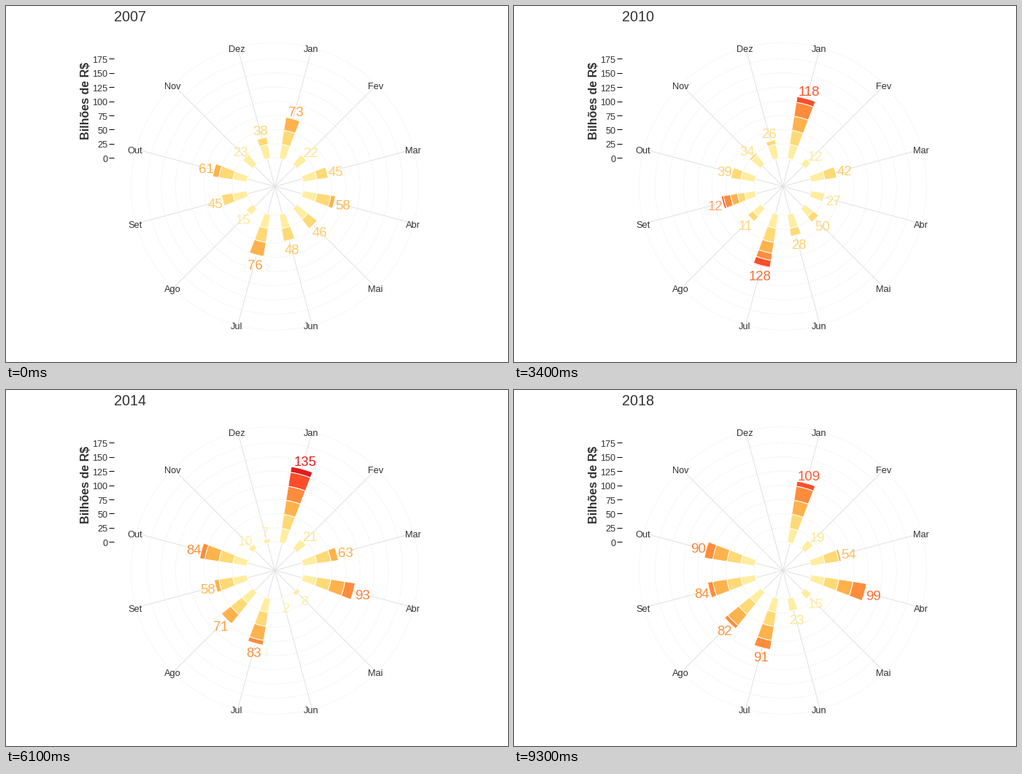
A matplotlib script for the animation above (10 s loop, 688x488 px).

```python
import numpy as np
import matplotlib.pyplot as plt
from matplotlib.animation import FuncAnimation
from matplotlib.colors import to_rgb
from matplotlib.patches import Circle, Wedge

W, H = 688, 488
CX, CY = 368.5, 247.3
UNIT = 0.7783          # pixels per billion
BASE, STEP = 50, 25    # value offset of the centre, size of one band
OUTER = 197
MONTHS = "Jan Fev Mar Abr Mai Jun Jul Ago Set Out Nov Dez".split()
PALETTE = ["#ffeda0", "#fed976", "#feb24c", "#fd8d3c",
           "#fc4e2a", "#e31a1c", "#b10026"]
RGB = np.array([to_rgb(c) for c in PALETTE])
INK = "#333333"

FIRST_YEAR = 2007
VALUES = np.array([
    [73, 22, 45, 58, 46, 48, 76, 15, 45, 61, 23, 38],
    [65, 24, 38, 74, 17, 30, 92, 16, 31, 30, 13, 35],
    [94, 10, 28, 39, 39, 34, 50, 26, 47, 51, 27, 42],
    [102, 15, 50, 25, 12, 50, 64, 48, 107, 46, 18, 40],
    [118, 12, 42, 27, 50, 28, 128, 11, 12, 39, 34, 26],
    [117, 76, 31, 29, 14, 51, 146, 69, 38, 26, 30, 37],
    [125, 45, 45, 62, 12, 25, 86, 70, 48, 55, 20, 22],
    [135, 21, 63, 93, 8, 2, 83, 71, 58, 84, 10, 7],
    [122, 16, 76, 113, 73, 3, 72, 26, 63, 151, 11, 5],
    [150, 17, 3, 161, 11, 3, 100, 100, 16, 113, 14, 43],
    [128, 40, 45, 90, 14, 12, 99, 88, 60, 100, 12, 25],
    [109, 19, 54, 99, 15, 23, 91, 82, 84, 90, 0, 0],
])
# Frame of the single in-between step after each year
BLENDS = [7, 16, 25, 34, 43, 52, 60, 68, 76, 84, 92]


def radius(value):
    return (value + BASE) * UNIT


def polar(r, degrees):
    a = np.radians(degrees)
    return CX + r * np.sin(a), CY - r * np.cos(a)


def bands(values):
    """Height of every colour band, one row per month."""
    starts = STEP * np.arange(len(PALETTE))
    return np.clip(values[:, None] - starts, 0, STEP)


def tints(values):
    pos = values / STEP - 0.5
    rgb = np.array([np.interp(pos, range(len(RGB)), c) for c in RGB.T]).T
    rgb += np.minimum(pos, 0)[:, None] * (RGB[1] - RGB[0]) * 0.5
    return np.clip(rgb, 0, 1)


def write(x, y, text, size, ha="center", **style):
    """Text whose capitals are vertically centred on y."""
    return ax.text(x, y + 0.345 * size, text, fontsize=size, ha=ha,
                   va="baseline", **style)


plt.rcParams["font.family"] = "Liberation Sans"
fig = plt.figure(figsize=(W / 72, H / 72), dpi=72, facecolor="white")
ax = fig.add_axes([0, 0, 1, 1])
ax.set(xlim=(0, W), ylim=(H, 0))
ax.axis("off")

ticks = range(0, 176, STEP)
for r in [radius(t) for t in ticks] + [OUTER]:
    ax.add_patch(Circle((CX, CY), r, fill=False, ec="#dedede", lw=0.9,
                        ls=(0, (1, 3)), zorder=1))
for i, month in enumerate(MONTHS):
    x, y = polar(OUTER, 15 + 30 * i)
    ax.plot([CX, x], [CY, y], color="#dedede", lw=0.9, zorder=1)
    write(x - 1.2, y + 1.3, month, 12.7, color=INK, zorder=5)
for t in ticks:
    y = CY - radius(t)
    ax.plot([141, 148], [y, y], color="black", lw=1, solid_capstyle="butt")
    write(139.5, y + 1.2, str(t), 12.6, ha="right", color=INK)
ax.text(114, 130, "Bilhões de R$", fontsize=16, fontweight="bold",
        rotation=90, rotation_mode="anchor", ha="center", va="baseline",
        color=INK)
title = write(148, 14.5, "", 19.8, ha="left", color=INK)

moving = []


def update(frame):
    while moving:
        moving.pop().remove()
    year = sum(frame > b for b in BLENDS)
    nxt = year + 1 if frame in BLENDS else year
    now, then = VALUES[year], VALUES[nxt]
    heights = (bands(now) + bands(then)) / 2
    colors = (tints(now) + tints(then)) / 2
    title.set_text(str(FIRST_YEAR + year))

    for i, row in enumerate(heights):
        angle = 15 + 30 * i
        level = 0
        for height, color in zip(row, PALETTE):
            if height > 0:
                level += height
                moving.append(ax.add_patch(Wedge(
                    (CX, CY), radius(level), angle - 96, angle - 84,
                    width=height * UNIT, fc=color, ec="white", lw=1,
                    zorder=3)))
        if then[i]:
            x, y = polar(radius(level + 15), angle)
            moving.append(write(x + 0.9, y + 1, str(then[i]), 18.6,
                                color=colors[i], zorder=6))
    return moving + [title]


anim = FuncAnimation(fig, update, frames=100, interval=100, repeat=True,
                     repeat_delay=0, blit=False)
plt.show()
```
